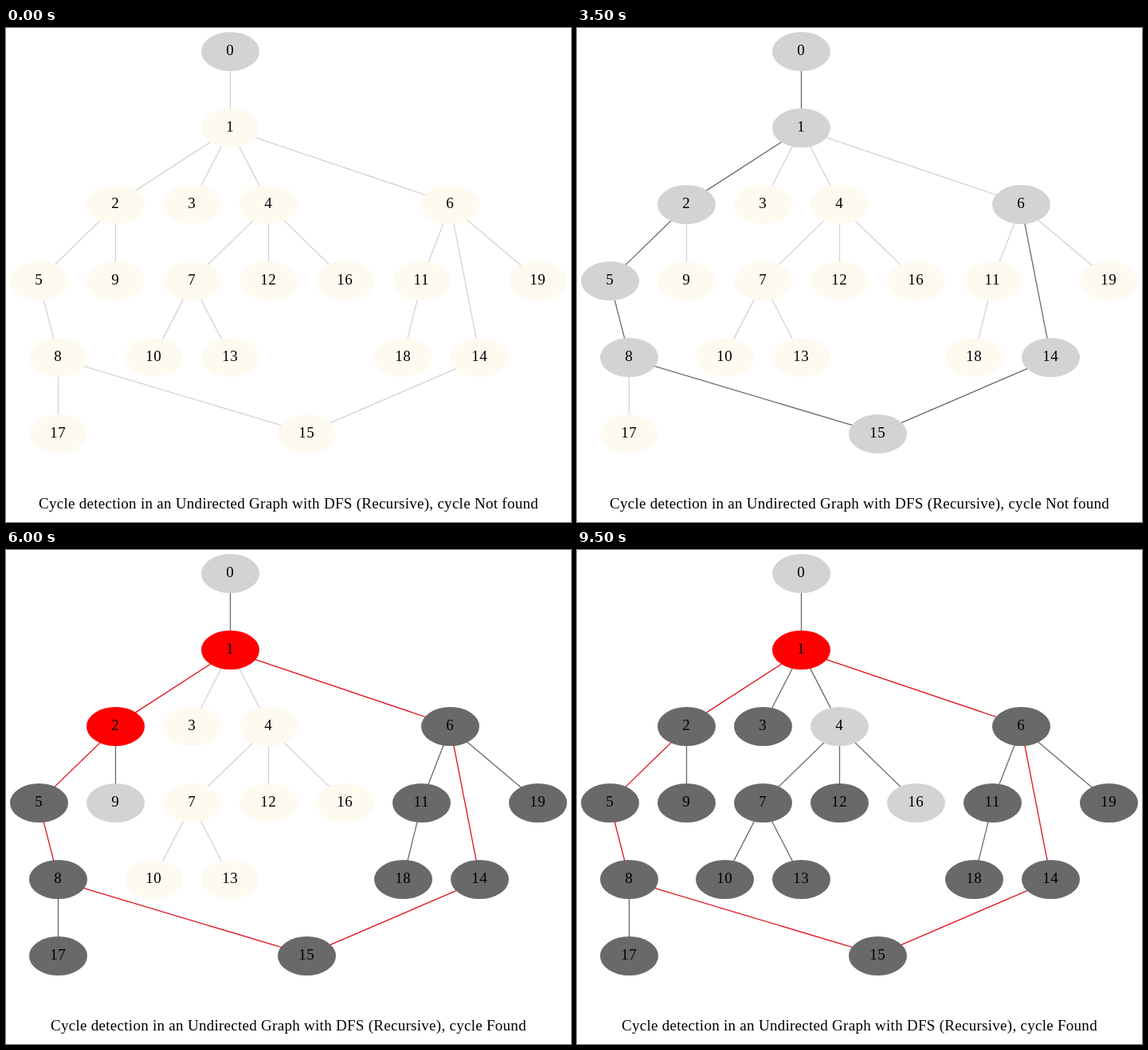
These frames come from a looping animation (709x620 px, 10000 ms). An HTML page:

```html
<!DOCTYPE html>
<html lang="en">
<head>
<meta charset="utf-8">
<title>Cycle detection with DFS</title>
<style>
  html, body { margin: 0; width: 100%; height: 100%; overflow: hidden; background: #fff; }
  svg { display: block; }
  text { font: 19px "Liberation Serif", "Times New Roman", serif; text-anchor: middle; letter-spacing: .5px; }
  #caption { letter-spacing: .28px; }
  line { stroke-width: 1.3; }
</style>
</head>
<body>
<svg width="709" height="620" viewBox="0 0 709 620">
  <g id="edges"></g>
  <g id="nodes"></g>
  <text id="caption" x="354.5" y="603"></text>
</svg>
<script>
const STEP = 500, GAP = 96;
const NEW = '#fffaf0', OPEN = '#d3d3d3', DONE = '#696969', CYCLE = '#ff0000', CYCLE_LINE = '#e0101c';

const places = [{ x: 281.5, y: 29.5 }];
const links = [];

// Hang children one row below their parent, evenly spaced from an offset
function fan(parent, children, offset = 0, gap = GAP) {
  const { x, y } = places[parent];
  children.forEach((child, i) => {
    places[child] = { x: x + offset + i * gap, y: y + GAP };
    links.push([parent, child]);
  });
}

fan(0, [1]);
fan(1, [2, 3, 4], -1.5 * GAP);
fan(1, [6], 276);
fan(2, [5, 9], -GAP);
fan(4, [7, 12, 16], -GAP);
fan(5, [8], GAP / 4);
fan(6, [11, 14, 19], -36, 73);
fan(7, [10, 13], -GAP / 2);
fan(8, [17, 15], 0, 3.25 * GAP);
fan(11, [18], -23);

// 14 also leads to 15, so it sits one row above it
links.push([14, 15]);
places[14].y = places[15].y - GAP;

const edgeOf = (a, b) => links.findIndex(l => l.includes(a) && l.includes(b));
const neighbours = places.map((_, n) =>
  links.filter(l => l.includes(n)).map(([a, b]) => a === n ? b : a).sort((a, b) => a - b));

// Run the search once, keeping a snapshot each time a node is entered
function search() {
  const nodes = places.map(() => NEW);
  const edges = links.map(() => OPEN);
  const path = [], states = [];
  let found = false;

  function visit(n, parent) {
    nodes[n] = OPEN;
    path.push(n);
    states.push({ nodes: [...nodes], edges: [...edges], found });
    for (const m of neighbours[n]) {
      if (nodes[m] === NEW) {
        edges[edgeOf(n, m)] = DONE;
        visit(m, n);
      } else if (m !== parent && !found) {
        found = true;
        const loop = path.slice(path.indexOf(m));
        loop.forEach((a, i) => {
          nodes[a] = CYCLE;
          edges[edgeOf(a, loop[(i + 1) % loop.length])] = CYCLE_LINE;
        });
      }
    }
    path.pop();
    nodes[n] = DONE;
  }

  visit(0, -1);
  return states;
}

function add(parent, tag, attrs) {
  const el = document.createElementNS('http://www.w3.org/2000/svg', tag);
  for (const key in attrs) el.setAttribute(key, attrs[key]);
  return document.getElementById(parent).appendChild(el);
}

// Edges leave and enter slightly off centre, which flattens the long ones
const lines = links.map(([a, b]) => add('edges', 'line', {
  x1: places[a].x, y1: places[a].y + 1.4, x2: places[b].x, y2: places[b].y - 1.4
}));
const ovals = places.map(({ x, y }, n) => {
  const oval = add('nodes', 'ellipse', { cx: x, cy: y, rx: 36.5, ry: 24.5 });
  add('nodes', 'text', { x: x - .25, y: y + 4.5 }).textContent = n;
  return oval;
});
const caption = document.getElementById('caption');

const states = search();
let shown = -1;

function show(step) {
  if (step === shown) return;
  shown = step;
  const { nodes, edges, found } = states[step];
  ovals.forEach((el, i) => el.setAttribute('fill', nodes[i]));
  lines.forEach((el, i) => el.setAttribute('stroke', edges[i]));
  caption.textContent = 'Cycle detection in an Undirected Graph with DFS (Recursive), cycle '
    + (found ? 'Found' : 'Not found');
}

const start = performance.now();
function tick() {
  show(Math.floor((performance.now() - start) / STEP) % states.length);
  requestAnimationFrame(tick);
}
tick();
</script>
</body>
</html>
```
